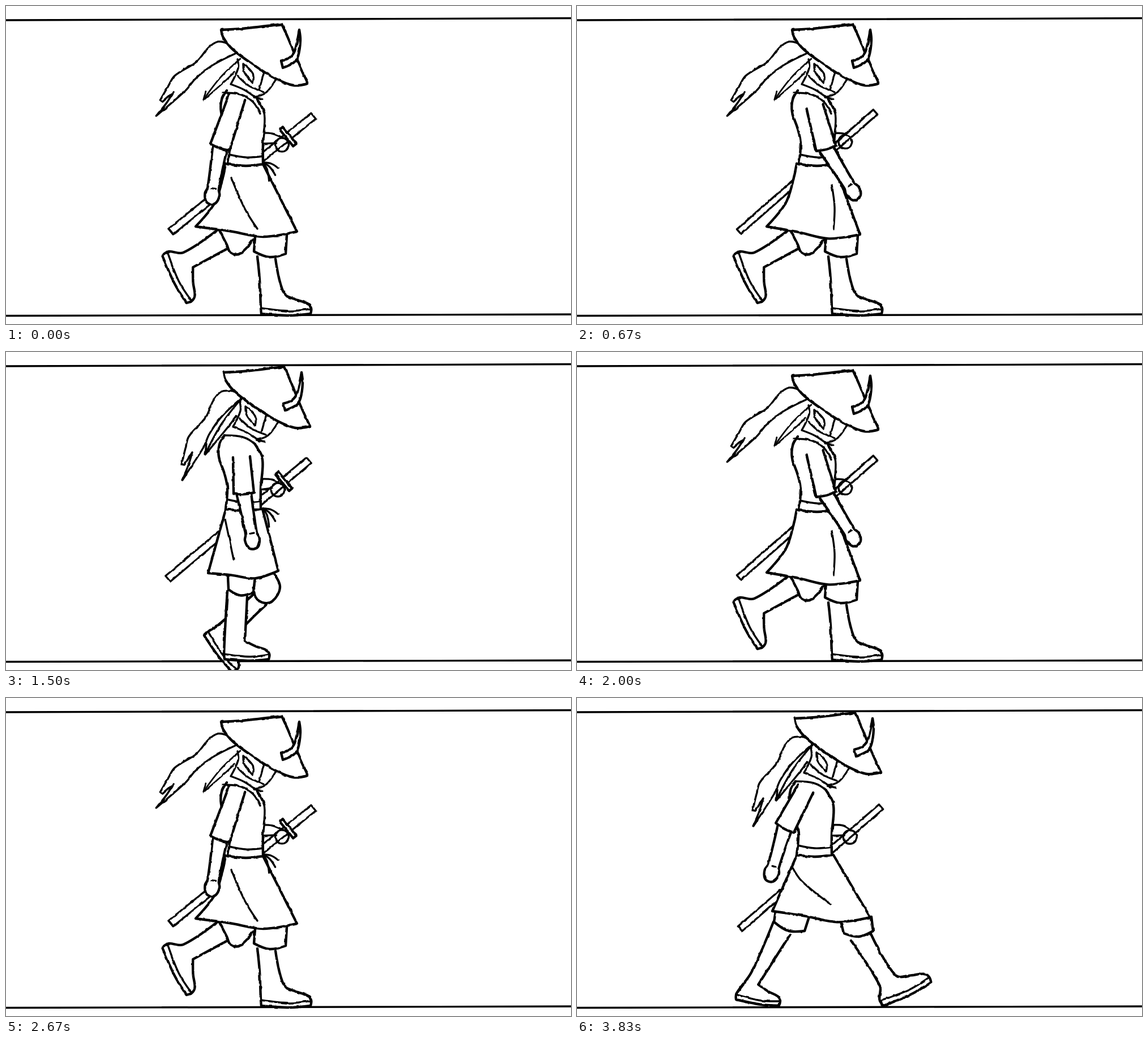
Write an HTML page that moves like this. It is 998 px wide and 561 px high and loops after 3910 ms.

```html
<!DOCTYPE html>
<html lang="en">
<head>
<meta charset="utf-8">
<title>Walk cycle</title>
<style>
html, body { margin: 0; width: 100%; height: 100%; overflow: hidden; background: #fff; }
svg { display: block; width: 100vw; height: 100vh; }
path { fill: none; stroke: #000; stroke-width: 3.4; stroke-linecap: round; stroke-linejoin: round; }
path.solid { fill: #fff; stroke-width: 4.4; }
</style>
</head>
<body>
<svg id="stage" viewBox="0 0 998 561">
  <defs>
    <filter id="ink" filterUnits="userSpaceOnUse" x="0" y="0" width="998" height="561" color-interpolation-filters="sRGB">
      <feTurbulence type="fractalNoise" baseFrequency="0.09" numOctaves="2" seed="4"/>
      <feDisplacementMap in="SourceGraphic" scale="3" xChannelSelector="R" yChannelSelector="G"/>
    </filter>
  </defs>
  <path d="M-5 25L1003 21.5M-5 546.5L1003 544"/>
</svg>
<script>
const stage = document.getElementById("stage");
const make = (tag, attrs, parent) => {
  const el = document.createElementNS(stage.namespaceURI, tag);
  for (const key in attrs) el.setAttribute(key, attrs[key]);
  return parent.appendChild(el);
};
const group = (parent, transform = "") => make("g", { transform }, parent);
const points = text => text.split(" ").map(p => p.split(",").map(Number));
const mix = (a, b, k) => a.map((v, i) => v + (b[i] - v) * k);
const dist = (a, b) => Math.hypot(b[0] - a[0], b[1] - a[1]);
const heading = (a, b) => Math.atan2(b[1] - a[1], b[0] - a[0]);

// Maps [along, side] to the stage, seen from a point and a direction.
const frame = ([x, y], angle, size = 1) => {
  const c = Math.cos(angle) * size, s = Math.sin(angle) * size;
  return list => list.map(([u, v]) => [x + u * c - v * s, y + u * s + v * c]);
};

// Smooth through gentle bends, keep sharp corners.
function curve(pts) {
  const dirs = pts.map((p, i) => {
    const a = pts[i - 1], b = pts[i + 1];
    if (!a || !b || Math.cos(heading(p, b) - heading(a, p)) < 0.5) return [0, 0];
    const len = dist(a, b);
    return [(b[0] - a[0]) / len, (b[1] - a[1]) / len];
  });
  return pts.reduce((d, b, i) => {
    if (!i) return "M" + b;
    const a = pts[i - 1], u = dirs[i - 1], v = dirs[i], k = dist(a, b) / 3;
    return d + `C${a[0] + u[0] * k},${a[1] + u[1] * k} ${b[0] - v[0] * k},${b[1] - v[1] * k} ${b}`;
  }, "");
}

const stroke = (g, pts, kind = "") =>
  make("path", { d: curve(typeof pts === "string" ? points(pts) : pts), class: kind }, g);
const solid = (g, pts) => stroke(g, pts, "solid");

function head(g) {
  solid(g, "384,36 420,34 491,26 502,50 520,94 537,131 512,134 480,122 440,97 405,71 388,50 384,36");
  solid(g, "490,91 505,85 514,73 522,36 524,55 520,82 512,94 493,103 490,91");
  stroke(g, "413,88 414,104 401,132 425,142 448,158");
  stroke(g, "423,96 425,111 440,130 440,113 423,96");
  stroke(g, "460,110 451,142");
  stroke(g, "481,123 463,147 442,155 457,158");
  stroke(g, "413,117 432,134 459,146");
  stroke(g, "386,147 418,150 440,163 453,184");
}

function hair(g, low) {
  const long = group(g, low ? "translate(-6 -1) rotate(16 402 69)" : "");
  stroke(long, "402,69 380,70 366,86 353,115 323,149 317,170 310,198 315,199 329,177 322,200 311,226 349,168 359,145 380,115 415,82");
  const short = group(g, low ? "translate(413 93) rotate(9) scale(.84) translate(-414 -83)" : "");
  stroke(short, "415,83 380,128 352,180 354,162");
  stroke(short, "352,181 390,135 407,113");
}

function torso(g) {
  solid(g, "386,147 377,163 376,185 386,215 391,240 388,277 420,280 450,277 450,240 453,190 440,163");
  stroke(g, "390,260 420,265 450,263");
}

function skirt(g, [left, right], flare) {
  const a = [388, 278], b = [453, 277];
  const hem = (k, sag) => { const p = mix(left, right, k); return [p[0], p[1] + sag]; };
  const side = mix(a, left, 0.6);
  solid(g, [a, [side[0] + flare, side[1]], left, hem(1 / 3, 5), hem(2 / 3, 12), right, b]);
}

function ties(g) {
  for (let i = 0; i < 3; i++) {
    stroke(g, frame([454, 276], 0.35 + i * 0.45)([[0, 0], [14, -3], [28 + i * 3, 0]]));
  }
}

function sword(g, [tip, end], guard) {
  const len = dist(tip, end), at = frame(tip, heading(tip, end)), w = guard ? 6.5 : 5.5;
  const box = (x0, x1, h) => at([[x0, -h], [x1, -h], [x1, h], [x0, h], [x0, -h]]);
  stroke(g, box(0, len, w));
  const [x, y] = mix(tip, end, 0.78), hand = [x, y + 6];
  stroke(g, [[450, 224], [470, 225], [x + 2, y - 6]]);
  stroke(g, [[450, 243], [x - 10, y + 3]]);
  const ring = Array.from({ length: 9 }, (_, i) => [12 * Math.cos(i * Math.PI / 4), 12 * Math.sin(i * Math.PI / 4)]);
  stroke(g, frame(hand, 0)(ring));
  if (guard) solid(g, box(len * 0.82 - 3, len * 0.82 + 4, 19));
}

function arm(g, [shoulder, elbow, wrist]) {
  const fore = dist(elbow, wrist), upper = dist(shoulder, elbow);
  const low = frame(elbow, heading(elbow, wrist)), top = frame(shoulder, heading(shoulder, elbow));
  solid(g, low([[0, -13], [fore, -10], [fore + 10, -13], [fore + 24, -9], [fore + 28, 0],
    [fore + 24, 9], [fore + 10, 13], [fore, 10], [0, 13]]));
  stroke(g, low([[fore, -4], [fore, 2]]));
  solid(g, top([[0, -15], [upper, -18], [upper + 2, 0], [upper, 18], [0, 15]]));
}

function leg(g, { cuff, shin, heel, turn, size }) {
  const [backKnee, ankle, frontKnee] = points(shin), knee = points(cuff);
  const foot = frame(heel, turn * Math.PI / 180, size);
  const boot = foot(points("-1,-12 0,0 50,3 87,0 88,-10 82,-18 62,-25 40,-36"));
  solid(g, [backKnee, ankle, ...boot, frontKnee]);
  stroke(g, foot([[0, -10], [50, -5], [88, -9]]));
  const [, a, b] = knee;
  const sag = frame(a, heading(a, b))([[dist(a, b) / 2, 8]]);
  solid(g, [...knee.slice(0, 2), ...sag, ...knee.slice(2)]);
}

// Far leg first, then the near one.
const stances = {
  push: [
    { cuff: "376,394 390,421 413,437 437,412", shin: "375,394 313,435 393,427", heel: [276, 440], turn: 63, size: 1.08 },
    { cuff: "440,408 438,433 494,437 496,404", shin: "444,442 448,482 476,446", heel: [451, 543], turn: 0, size: 1 }
  ],
  pass: [
    { cuff: "440,396 439,428 470,440 484,414 471,388", shin: "440,425 372,484 466,440", heel: [350, 500], turn: 52, size: 0.95 },
    { cuff: "392,396 393,419 437,424 440,396", shin: "391,422 388,470 426,432", heel: [386, 542], turn: 0, size: 0.9 }
  ],
  lift: [
    { cuff: "368,388 366,411 405,422 418,390", shin: "371,415 340,501 402,424", heel: [328, 543], turn: 0, size: 0.92 },
    { cuff: "462,390 470,412 510,417 504,378", shin: "476,422 459,488 503,423", heel: [455, 511], turn: 0, size: 0.9 }
  ],
  reach: [
    { cuff: "351,375 348,395 402,411 411,383", shin: "347,395 308,484 376,418", heel: [281, 532], turn: 8, size: 0.88 },
    { cuff: "466,394 471,415 523,411 520,386", shin: "484,428 535,508 519,416", heel: [541, 543], turn: -26, size: 1.08 }
  ]
};

const poses = [
  { stance: "push", skirt: "335,389 514,398", arm: "408,161 378,249 366,322", sword: "291,398 543,194", fold: "398,303 422,358 444,393", guard: true },
  { stance: "pass", skirt: "357,390 481,386", arm: "416,185 420,249 433,320", sword: "286,400 535,191", fold: "387,295 402,366", guard: true },
  { stance: "lift", skirt: "357,390 506,386", arm: "416,185 436,250 466,318", sword: "286,400 538,191", fold: "387,295 402,366", guard: true },
  { stance: "reach", skirt: "345,376 518,387", arm: "420,171 449,238 500,313", sword: "289,401 519,182", fold: "445,298 431,334 414,360" },
  { stance: "push", skirt: "335,389 500,403", arm: "420,177 440,251 481,317", sword: "286,398 527,187", fold: "450,316 455,355 453,394" },
  { stance: "pass", skirt: "357,390 481,386", arm: "416,185 420,249 433,320", sword: "286,398 529,187", fold: "387,295 402,366" },
  { stance: "lift", skirt: "357,390 506,386", arm: "412,180 396,250 388,320", sword: "286,402 532,190", fold: "400,300 430,360" },
  { stance: "reach", skirt: "345,376 518,387", arm: "404,160 367,229 347,297", sword: "288,407 537,192", fold: "380,298 397,323 448,364" }
];

function drawPose(pose) {
  const g = make("g", { filter: "url(#ink)", display: "none" }, stage);
  const low = pose.stance === "push";
  stances[pose.stance].forEach(spec => leg(g, spec));
  const body = group(g, pose.stance === "lift" ? "translate(0 -8)" : "");
  hair(body, low);
  sword(body, points(pose.sword), pose.guard);
  skirt(body, points(pose.skirt), low ? 14 : 0);
  torso(group(body, low ? "translate(4 2)" : ""));
  stroke(body, pose.fold);
  if (pose.guard) ties(body);
  arm(body, points(pose.arm));
  head(group(body, low ? "translate(-4 6)" : ""));
  return g;
}

const frames = poses.map(drawPose);
const loop = 3910;
const starts = Array.from({ length: 24 }, (_, i) => Math.round(i * 100 / 6) * 10);
const t0 = performance.now();
let shown = -1;

function tick() {
  const t = (performance.now() - t0) % loop;
  const now = (starts.filter(s => s <= t).length - 1) % poses.length;
  if (now !== shown) {
    frames.forEach((g, i) => g.setAttribute("display", i === now ? "inline" : "none"));
    shown = now;
  }
  requestAnimationFrame(tick);
}
tick();
</script>
</body>
</html>
```
